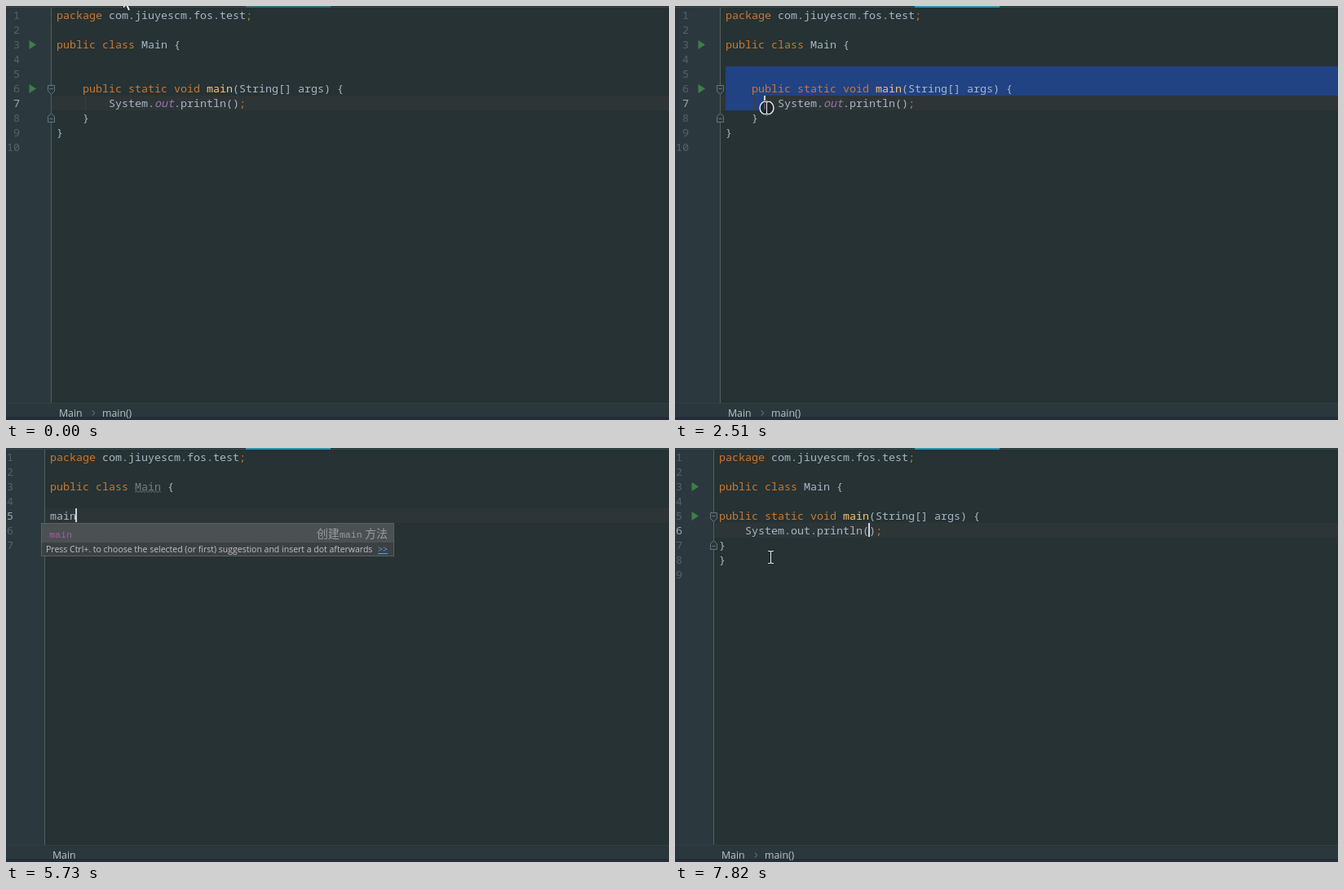
Write an HTML page that moves like this. It is 813 px wide and 508 px high and loops after 8 s.

```html
<!DOCTYPE html>
<html lang="en">
<head>
<meta charset="utf-8">
<title>Live template demo</title>
<style>
  html, body { margin: 0; width: 100%; height: 100%; overflow: hidden; background: #263233; }
  svg { display: block; width: 813px; height: 508px; }
  text { white-space: pre; }
  .code { font: 13.333px "Noto Sans Mono", monospace; fill: #a9b7c6; }
  .num { fill: #566166; text-anchor: end; }
  .num.on { fill: #a4a9ab; }
  .kw { fill: #cc7832; }
  .fn { fill: #ffc66d; }
  .field { fill: #9876aa; font-style: italic; }
  .unused { fill: #787f80; }
  .crumb { font: 12.3px "Open Sans", sans-serif; fill: #bcc3c6; }
  .item { font: 11.667px "Liberation Mono", monospace; fill: #a05fa3; }
  .desc { fill: #999c9e; text-anchor: end; }
  .cjk { font: 300 14px "Noto Sans CJK SC", "Noto Sans CJK", sans-serif; }
  .hint { font: 10.5px "Open Sans", sans-serif; fill: #c0c3c5; }
  .link { fill: #589df6; text-decoration: underline; }
</style>
</head>
<body>
<svg id="stage" viewBox="0 0 813 508"></svg>
<script>
const LOOP = 8000, W = 813, CELL = 8, ROW = 18, LEFT = 62;
const GUTTER = '#2b393e', TAB = '#3590ad';

const head = ['package com.jiuyescm.fos.test;', '', 'public class Main {', ''];
const MAIN = 'public static void main(String[] args) {';
const PRINT = 'System.out.println();';
const full = [...head, '', '    ' + MAIN, '        ' + PRINT, '    }', '}', ''];
const typing = word => [...head, word, '}', ''];
const body = text => [...head, MAIN, '    ' + text, '}', '}', ''];

const beam = (x, y) => ({ mouse: ['beam', x, y] });
const press = (x, y) => ({ mouse: ['press', x, y] });
const arrow = (x, y) => ({ mouse: ['arrow', x, y] });

// Each step changes only the listed parts of the state.
const steps = [
  [0, { lines: full, row: 7, caret: null, sel: null, runs: [3, 6], folds: [6, 8], crumb: true,
        tab: '#2f6d75', named: true, fieldKnown: true, unused: false, bulb: false, popup: null,
        ...arrow(143, -13) }],
  [150, { ...beam(152, 12), tab: '#31787f' }],
  [280, { ...beam(166, 40), tab: '#338494' }],
  [410, { ...beam(183, 75), tab: TAB }],
  [550, beam(200, 108)],
  [680, beam(213, 133)],
  [810, beam(220, 143)],
  [950, beam(223, 135)],
  [1080, beam(224, 126)],
  [1640, beam(206, 123)],
  [1780, beam(166, 114)],
  [1930, beam(122, 101)],
  [2070, beam(97, 93)],
  [2210, beam(90, 91)],
  [2360, { ...press(73, 86), row: 5, caret: 0 }],
  [2510, { ...press(112, 125), row: 7, caret: 6, sel: 5 }],
  [2940, { ...press(115, 130), row: 8, caret: 5 }],
  [3080, press(117, 134)],
  [3210, { ...beam(117, 134), crumb: false }],
  [4050, { bulb: true }],
  [4480, { lines: typing(''), row: 5, caret: 0, sel: null, bulb: false, mouse: null, folds: null, runs: [3] }],
  [4620, { runs: [] }],
  [4760, { unused: true }],
  [5220, { caret: null }],
  [5490, { lines: typing('m'), caret: 1 }],
  [5610, { lines: typing('mai'), caret: 3 }],
  [5730, { lines: typing('main'), caret: 4, popup: [43, 92, 'main', '创建', 'main', ' 方法'] }],
  [6190, { lines: body(''), row: 6, caret: 4, popup: null, named: false, fieldKnown: false }],
  [6470, { runs: [3, 5], folds: [5, 7], unused: false, named: true }],
  [6620, { crumb: true, caret: null }],
  [7150, { lines: body('p'), caret: 5 }],
  [7390, { lines: body('pl'), caret: 6, ...arrow(115, 133) }],
  [7540, { lines: body('pln'), caret: 7, popup: [75, 110, 'pln', '打印', 'out', ' 语句'] }],
  [7820, { lines: body(PRINT), caret: 23, popup: null, ...beam(117, 134) }],
];
const states = [];
for (const [at, change] of steps) states.push({ ...states.at(-1), ...change, at });

const rect = (x, y, w, h, fill) => `<rect x="${x}" y="${y}" width="${w}" height="${h}" fill="${fill}"/>`;
const path = (d, fill, stroke = 'none', width = 1) =>
  `<path d="${d}" fill="${fill}" stroke="${stroke}" stroke-width="${width}"/>`;
const label = (x, y, cls, s) => `<text x="${x}" y="${y}" class="${cls}">${s}</text>`;
const span = (cls, s) => `<tspan class="${cls}">${s}</tspan>`;
const rowTop = row => ROW * (row - 1) + 2;

function highlight(line, s) {
  return line.replace(/\b(package|public|class|static|void)\b|;|\bmain(?=\()|\bMain\b|\bout\b/g, word => {
    if (word === 'main') return s.named ? span('fn', word) : word;
    if (word === 'Main') return s.unused ? span('unused', word) : word;
    if (word === 'out') return s.fieldKnown ? span('field', word) : word;
    return span('kw', word);
  });
}

function drawSelection(s) {
  let out = '';
  for (let r = s.sel; r < s.row; r++) out += rect(LEFT, rowTop(r), W, ROW, '#214283');
  return out + rect(LEFT, rowTop(s.row), s.caret * CELL, ROW, '#214283');
}

function drawFolds([open, close]) {
  const a = rowTop(open) + 5.5, b = rowTop(close) + 14.5, line = '#66757a';
  return path(`M51.5 ${a}h8v7l-4 4-4-4z`, GUTTER, line) + path(`M53.5 ${a + 4}h4`, 'none', line)
    + path(`M51.5 ${b}h8v-7l-4-4-4 4z`, GUTTER, line) + path(`M53.5 ${b - 4}h4`, 'none', line);
}

function drawEditor(s) {
  let out = rect(0, 0, 55, 487, GUTTER) + rect(56, rowTop(s.row), W, ROW, '#2e3537');
  if (s.sel) out += drawSelection(s);
  out += rect(55, 2, 1, 485, '#506062');
  if (s.lines === full) out += rect(97, 110, 1, ROW, '#3b3d3d');
  s.lines.forEach((line, i) => {
    const y = rowTop(i + 1) + 14;
    out += label(17, y, 'code num' + (i + 1 === s.row ? ' on' : ''), i + 1);
    if (line) out += label(LEFT, y, 'code', highlight(line, s));
  });
  if (s.unused) out += path('M166 54.5' + 'l2-2 2 2'.repeat(8), 'none', '#777e7f', 0.9);
  for (const r of s.runs) out += path(`M28.5 ${rowTop(r) + 4}v11l8.5-5.5z`, '#3d7f48');
  if (s.folds) out += drawFolds(s.folds);
  if (s.caret !== null) out += rect(LEFT + s.caret * CELL - 1, rowTop(s.row), 2, ROW - 1, '#d0d4d6');
  out += label(65, 504, 'crumb', 'Main');
  if (s.crumb) out += path('M106 496.5l2.5 3-2.5 3', 'none', '#7b878b') + label(118, 504, 'crumb', 'main()');
  return out;
}

function drawPopup([x, y, word, before, latin, after]) {
  const desc = span('cjk', before) + latin + span('cjk', after);
  return `<g transform="translate(${x} ${y})">`
    + rect(0, 0, 433, 41, '#5a6063') + rect(1, 1, 431, 23, '#4b5053') + rect(1, 24, 431, 16, '#3b4043')
    + label(10, 18, 'item', word) + label(425, 18, 'item desc', desc)
    + label(6, 36, 'hint', 'Press Ctrl+. to choose the selected (or first) suggestion and insert a dot afterwards')
    + label(413, 36, 'hint link', '&gt;&gt;') + '</g>';
}

function drawMouse([kind, x, y]) {
  const ibeam = 'M-3.5-7.5h2.5l1 1 1-1h2.5M0-6.5v13M-3.5 7.5h2.5l1-1 1 1h2.5';
  let out = '';
  if (kind === 'arrow') {
    out = path('M.5.5v16l3.7-3.5 2.6 6 2.6-1.1-2.6-5.9h5.2z', '#fff', '#111', 0.8);
  } else {
    if (kind === 'press') out = '<circle r="8.5" fill="#1c2226" fill-opacity=".75" stroke="#eee" stroke-width="1.4"/>';
    out += path(ibeam, 'none', '#172022', 2.4) + path(ibeam, 'none', '#e8ebeb', 1.1);
  }
  return `<g transform="translate(${x + (kind === 'arrow' ? 0 : 0.5)} ${y})">${out}</g>`;
}

function drawBulb() {
  return '<circle cx="76" cy="132.3" r="5.2" fill="#f2a93b"/>' + path('M73 135h6l-.8 3h-4.4z', '#f2a93b')
    + rect(73.5, 138, 5, 1, '#b8b0a2') + rect(74, 140, 4, 1, '#b8b0a2');
}

function draw(s) {
  const shift = s.lines.length < 10 ? -CELL : 0;
  return rect(0, 0, W, 508, '#263233')
    + rect(0, 487, W, 17, '#2a383d') + rect(0, 487, W, 1, '#303f44') + rect(0, 504, W, 4, '#252d38')
    + `<g transform="translate(${shift} 0)">${drawEditor(s)}</g>`
    + rect(0, 0, W, 1, '#2a383d') + rect(0, 1, W, 1, '#39484c') + rect(294, 0, 104, 2, s.tab)
    + (s.bulb ? drawBulb() : '')
    + (s.popup ? drawPopup(s.popup) : '')
    + (s.mouse ? drawMouse(s.mouse) : '');
}

const stage = document.getElementById('stage');
const start = performance.now();
let shown;
function tick() {
  const t = Math.max(0, performance.now() - start) % LOOP;
  const state = states.findLast(s => s.at <= t);
  if (state !== shown) stage.innerHTML = draw(shown = state);
  requestAnimationFrame(tick);
}
tick();
</script>
</body>
</html>
```
